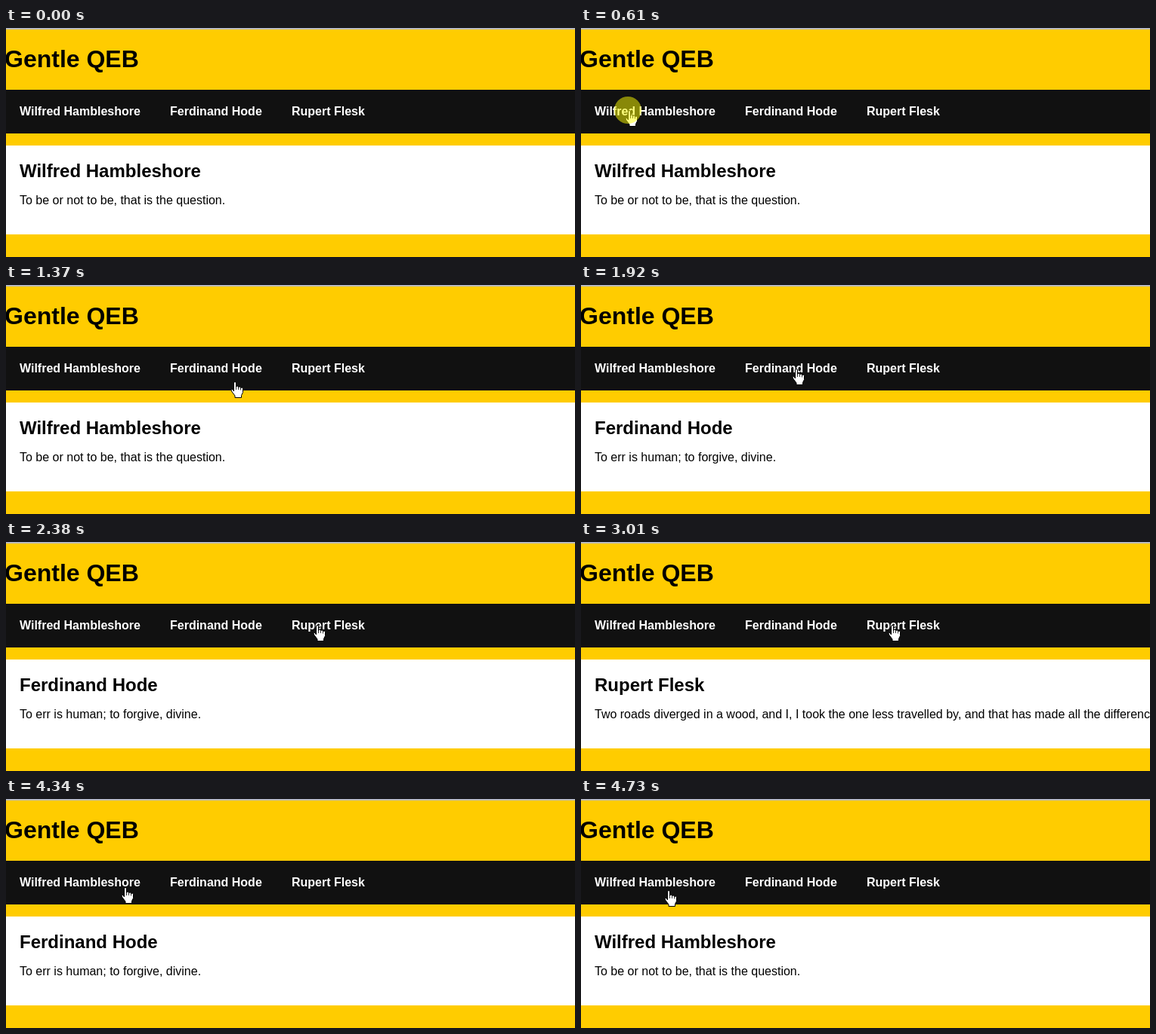
Recreate the animation shown at these times as an HTML page. Size 753 by 304 pixels, loop 5130 ms.

```html
<!DOCTYPE html>
<html lang="en">
<head>
<meta charset="utf-8">
<style>
  html, body { margin: 0; width: 100%; height: 100%; overflow: hidden; }
  body { position: relative; background: #fc0; color: #000; font: 16px/18px "Liberation Sans", Arial, sans-serif; }
  body > *, nav b { position: absolute; margin: 0; white-space: nowrap; }
  .edge { left: 0; top: 0; width: 100%; height: 2px; background: #bbb; }
  h1 { left: -2px; top: 23px; font-size: 32px; line-height: 37px; }
  nav { left: 0; top: 82px; width: 100%; height: 58px; background: #111; color: #fff; }
  nav b { top: 20px; }
  .panel { left: 0; top: 156px; width: 100%; height: 118px; background: #fff; }
  h2 { left: 18px; top: 176px; font-size: 24px; line-height: 28px; }
  p { left: 18px; top: 220px; }
  svg { left: 0; top: 0; }
</style>
</head>
<body>
<div class="edge"></div>
<h1>Gentle QEB</h1>
<nav>
  <b style="left:18px">Wilfred Hambleshore</b>
  <b style="left:217px">Ferdinand Hode</b>
  <b style="left:378px">Rupert Flesk</b>
</nav>
<div class="panel"></div>
<h2></h2>
<p></p>
<svg width="753" height="304">
  <g id="hand" stroke="#000">
    <path fill="#fff" d="M3.5 13V2a1.5 1.5 0 0 1 3 0V7.5q0-1.5 1.5-1.5t1.5 1.5v.7q0-1.3 1.5-1.3t1.5 1.4v.8q.2-1.2 1.5-1.1t1.5 1.3v5.2l-2 4v3h-8.5v-2.5l-4.5-6q-.8-2 .5-2.7 1-.4 2 2z"/>
    <path fill="none" stroke-width=".8" d="M6.5 7v4M9.5 8v3M12.5 9v2.5"/>
  </g>
  <circle id="click" r="18" fill="#ff0" fill-opacity=".5"/>
</svg>
<script>
const LOOP = 5130;
const names = [...document.querySelectorAll("nav b")].map(b => b.textContent);
const quotes = [
  "To be or not to be, that is the question.",
  "To err is human; to forgive, divine.",
  "Two roads diverged in a wood, and I, I took the one less travelled by, and that has made all the difference."
];
// Page changes: [time, index]
const pages = [[0, 0], [1920, 1], [3010, 2], [4030, 1], [4730, 0]];
const clicks = [[610, 680], [1770, 1920], [2860, 3010], [3870, 3950], [4580, 4660]];
// Each move runs in discrete steps to (x, y), sagging by dip on the way
const moves = [
  { from: 70, to: 380, steps: 5, x: 59, y: 109, dip: 0 },
  { from: 910, to: 1370, steps: 7, x: 298, y: 128, dip: 13 },
  { from: 1540, to: 1620, steps: 2, x: 280, y: 111, dip: 0 },
  { from: 2150, to: 2380, steps: 4, x: 407, y: 110, dip: 5 },
  { from: 3640, to: 3800, steps: 3, x: 272, y: 106, dip: 0 },
  { from: 4260, to: 4410, steps: 3, x: 111, y: 121, dip: 0 }
];
const hand = document.getElementById("hand");
const click = document.getElementById("click");
const title = document.querySelector("h2");
const quote = document.querySelector("p");

function handAt(t) {
  let x = 48, y = 127;
  for (const m of moves) {
    if (t < m.from) break;
    const gap = (m.to - m.from) / (m.steps - 1);
    const p = Math.min(1, (Math.floor((t - m.from) / gap) + 1) / m.steps);
    const e = p * p * (3 - 2 * p);
    x += (m.x - x) * e;
    y += (m.y - y) * e + m.dip * 4 * e * (1 - e);
  }
  return [Math.round(x), Math.round(y)];
}

function show(node, visible) {
  node.style.visibility = visible ? "visible" : "hidden";
}

function draw(now) {
  const t = now % LOOP;
  const page = pages.filter(([start]) => t >= start).pop()[1];
  title.textContent = names[page];
  quote.textContent = quotes[page];

  const [x, y] = handAt(t);
  hand.setAttribute("transform", `translate(${x} ${y})`);
  show(hand, t >= moves[0].from);
  click.setAttribute("cx", x + 3);
  click.setAttribute("cy", y);
  show(click, clicks.some(([on, off]) => t >= on && t < off));
}

const start = performance.now();
function tick() {
  draw(performance.now() - start);
  requestAnimationFrame(tick);
}
tick();
</script>
</body>
</html>
```
